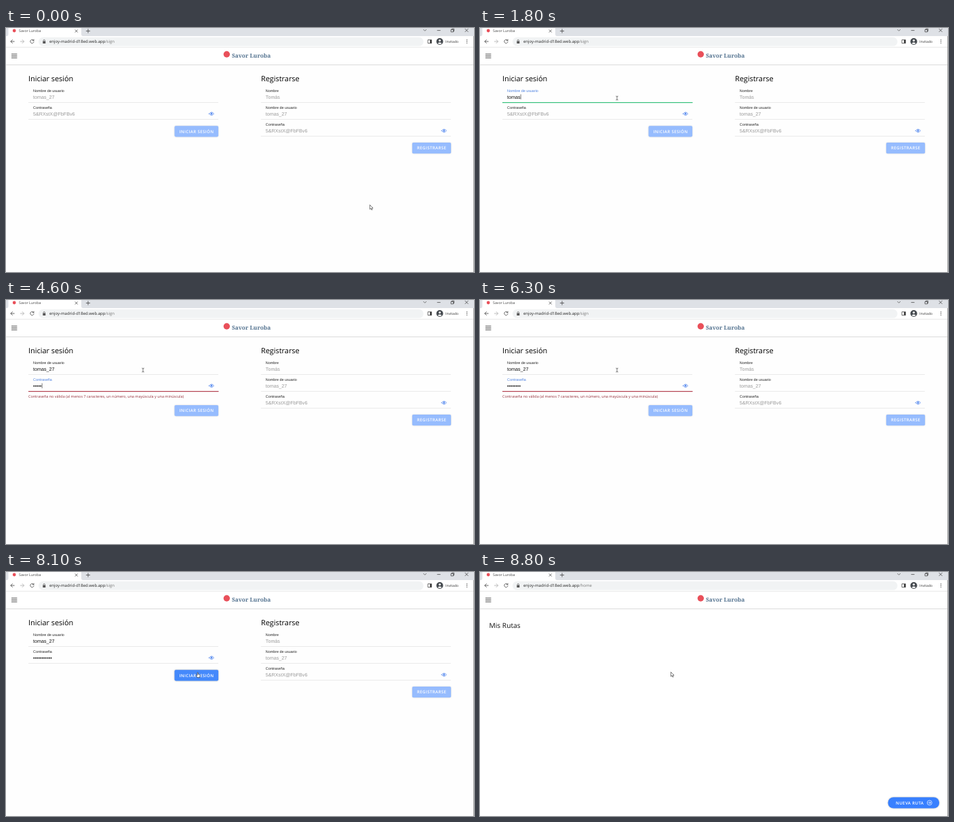
These frames come from a looping animation (690 px wide and 362 px high, 9 s). An HTML page:

```html
<!DOCTYPE html>
<html lang="es">
<head>
<meta charset="utf-8">
<title>Savor Luroba</title>
<style>
  html, body { margin: 0; width: 100%; height: 100%; overflow: hidden; background: #fff; }
  svg { display: block; width: 100%; height: 100%; }
  text { text-rendering: geometricPrecision; white-space: pre; }
  .ui { font-family: "Open Sans", "Noto Sans", sans-serif; }
  .form { font-family: "Liberation Sans", Arial, sans-serif; }
  .brand { font-family: "Noto Serif", serif; font-weight: 700; }
  .caps { font-weight: 600; letter-spacing: .06em; }
  .line { fill: none; stroke-linecap: round; stroke-linejoin: round; }
  .raised { filter: drop-shadow(0 .7px .8px rgba(0, 0, 0, .3)); }
</style>
</head>
<body>
<svg id="stage" viewBox="0 0 690 362" xmlns="http://www.w3.org/2000/svg"></svg>
<script>
const LOOP = 9000, STEP = 100;
const BRAND = 'Savor Luroba', USER = 'tomas_27', SECRET = '5&amp;RXstX@FbFBv6';
const BLUE = '#3880ff', LABEL = '#222', HINT = '#999';
const RED = '#b3404f', GREEN = '#35c07a';

const userKeys = [1200, 1400, 1600, 1700, 1800, 2300, 2600, 2900];
const passKeys = [3800, 4000, 4300, 4500, 4600, 5200, 5600, 5800, 6500, 6700, 6900];
const FOCUS_USER = 700, FOCUS_PASS = 3200, BLUR = 7900, VALID_LENGTH = 9, PAGE_IN = 8350;

// Markup helpers
const text = (x, y, size, str, fill = LABEL, cls = 'ui', extra = '') =>
  `<text x="${x}" y="${y}" font-size="${size}" fill="${fill}" class="${cls}" ${extra}>${str}</text>`;
const rect = (x, y, w, h, fill, extra = '') =>
  `<rect x="${x}" y="${y}" width="${w}" height="${h}" fill="${fill}" ${extra}/>`;
const circle = (x, y, r, fill, extra = '') =>
  `<circle cx="${x}" cy="${y}" r="${r}" fill="${fill}" ${extra}/>`;
const line = (d, color = '#555', width = .8) =>
  `<path class="line" d="${d}" stroke="${color}" stroke-width="${width}"/>`;
const group = (id, body, extra = '') => `<g id="${id}" ${extra}>${body}</g>`;

const eye = (x, y) => `<g transform="translate(${x} ${y})">` +
  line('M-3.5 0Q0-4.6 3.5 0Q0 4.6-3.5 0Z', '#5b8def', .9) +
  circle(0, 0, 1.35, '#5b8def') + '</g>';

const field = (x, y, label, hint, id = '') =>
  text(x + 7, y + 1.9, 5.4, label, LABEL, 'form', id && `id="${id}Label"`) +
  text(x + 7, y + 11.6, 7.2, hint, HINT, 'form', id && `id="${id}Text"`) +
  rect(x, y + 17.3, 280, .6, '#dedede') +
  (id && rect(x, y + 17, 280.5, 1.2, RED, `id="${id}Bar"`));

const button = (x, y, w, label, id) => group(id,
  rect(x, y, w, 16.2, BLUE, 'rx="1.8" class="raised"') +
  text(x + w / 2 + .2, y + 10.4, 6.15, label, '#fff', 'ui caps', 'text-anchor="middle"'),
  'opacity=".52"');

const header = () =>
  rect(0, 28.6, 690, 25.4, '#fff', 'style="filter:drop-shadow(0 .6px .9px rgba(0,0,0,.35))"') +
  [38.8, 41.5, 44.2].map(y => rect(8, y - .45, 8.4, .9, '#333')).join('') +
  circle(325.4, 39, 4.7, '#e9505a') +
  text(333, 43.6, 8.3, BRAND, '#53728f', 'brand');

const browser = () =>
  rect(0, 0, 690, 12, '#dee1e6') +
  '<path d="M1 12Q3.5 12 3.5 9V0H111V9Q111 12 113.5 12Z" fill="#fff"/>' +
  rect(0, 12, 690, 16.6, '#fff') +
  circle(12.2, 4, 2.4, '#e9505a') +
  text(19, 6.2, 5.25, BRAND, '#444') +
  line('M102 2.8l3.4 3.4m0-3.4l-3.4 3.4', '#444', .8) +
  line('M118.3 4.5h5.4m-2.7-2.7v5.4', '#444', .8) +
  line('M615.6 2.3l2 2l2-2', '#444', .7) +
  line('M636 3.6h4.2', '#333', .7) +
  line('M656.4 2.4h3.2v3.4h-3.2zM657.4 2.2v-.9h3.2v3.4h-.8', '#333', .7) +
  line('M677 1.4l4.2 4.2m0-4.2l-4.2 4.2', '#333', .7) +
  line('M12.2 20H7m2.4-2.5L7 20l2.4 2.5', '#555', .9) +
  line('M21.3 20h5.2m-2.4-2.5l2.4 2.5l-2.4 2.5', '#b5b5b5', .9) +
  line('M40.8 18.5a2.7 2.7 0 1 0 .3 2.2M41 17v1.8h-1.8', '#555', .9) +
  rect(48, 13.8, 567.5, 13, '#f1f3f4', 'rx="6.5"') +
  rect(54.3, 19.6, 4, 3.4, '#555', 'rx=".5"') +
  line('M55.1 19.6v-1a1.2 1.2 0 0 1 2.4 0v1', '#555', .7) +
  text(64, 22.4, 6, 'enjoy-madrid-d18ed.web.app<tspan id="path" fill="#777"></tspan>', '#222') +
  line('M622.4 17.6h5v5h-5z', '#444', .8) + rect(625, 17.6, 2.4, 5, '#444') +
  circle(639.5, 20, 5, '#454a4f') + circle(639.5, 18.5, 1.6, '#fff') +
  '<path d="M636.5 22.8q3-3 6 0q-3 2.4-6 0z" fill="#fff"/>' +
  text(648, 21.9, 5.05, 'Invitado', '#333') +
  [17.7, 20, 22.3].map(y => circle(679.6, y, .65, '#444')).join('') +
  rect(0, 28.2, 690, .5, '#dcdcdc');

const signPage = () =>
  header() +
  text(33, 79.3, 10.9, 'Iniciar sesión', '#000', 'ui', 'font-weight="500"') +
  field(33, 93, 'Nombre de usuario', USER, 'user') +
  field(33, 118, 'Contraseña', SECRET, 'pass') + eye(303, 127.2) +
  rect(0, 0, .6, 7.4, '#222', 'id="caret"') +
  text(33, 145.4, 5.48, 'Contraseña no válida (al menos 7 caracteres, un número, ' +
    'una mayúscula y una minúscula)', '#96303c', 'ui', 'id="error"') +
  button(248.5, 145.2, 64.6, 'INICIAR SESIÓN', 'login') +
  text(376, 79.3, 10.9, 'Registrarse', '#000', 'ui', 'font-weight="500"') +
  field(375.8, 93, 'Nombre', 'Tomás') +
  field(375.8, 118, 'Nombre de usuario', USER) +
  field(375.8, 143, 'Contraseña', SECRET) + eye(645.8, 152.4) +
  button(598.9, 170, 57.2, 'REGISTRARSE', 'register');

const homePage = () => group('home',
  rect(0, 28.6, 690, 352, '#fff') + header() +
  text(13.6, 82.6, 10.2, 'Mis Rutas', '#111') +
  rect(601.5, 334.2, 75.6, 16.4, BLUE, 'rx="8.2" class="raised"') +
  text(613, 344.7, 6.15, 'NUEVA RUTA', '#fff', 'ui caps') +
  line('M660.9 342.4h3.6m-1.6-1.6l1.6 1.6l-1.6 1.6', '#fff', .7) +
  circle(662.8, 342.4, 3.5, 'none', 'stroke="#fff" stroke-width=".7"'));

const pointers = () =>
  group('arrow', '<path d="M-1.6-3.6V3L0 1.6L1.1 4L2.1 3.5L1.1 1.2H3.1Z" ' +
    'fill="#fff" stroke="#222" stroke-width=".6" stroke-linejoin="round"/>') +
  group('beam', line('M-1.3-2.9Q0-2.9 0-2.2V2.2Q0 2.9-1.3 2.9M1.3-2.9Q0-2.9 0-2.2M0 2.2Q0 2.9 1.3 2.9', '#222', .6)) +
  group('hand', '<path d="M-1-3.6q.7-.6 1.2 0V-1.2L2.6-.7Q3.3-.4 3.1.6L2.5 3.6H-.8L-2.8.8Q-2.8-.2-1.7.1L-1 .7Z" ' +
    'fill="#fff" stroke="#222" stroke-width=".6" stroke-linejoin="round"/>');

const stage = document.getElementById('stage');
stage.innerHTML = rect(0, 0, 690, 362, '#fefefe') + signPage() + homePage() + browser() +
  rect(689, 12, .8, 350, '#8c8c8c') + pointers();
const el = Object.fromEntries([...stage.querySelectorAll('[id]')].map(n => [n.id, n]));

// Motion helpers
const clamp = v => Math.min(1, Math.max(0, v));
const progress = (t, from, duration) => clamp((t - from) / duration);
const smooth = p => p * p * (3 - 2 * p);
const mix = (a, b, p) => a + (b - a) * p;
const show = (node, on) => node.setAttribute('visibility', on ? 'visible' : 'hidden');
const set = (node, attrs) => {
  for (const key in attrs) node.setAttribute(key, attrs[key]);
};
const typedCount = (keys, t) => keys.filter(k => k <= t).length;

function drawField(name, value, hint, focused, bar, color) {
  el[name + 'Text'].textContent = value || hint;
  set(el[name + 'Text'], { fill: value ? '#111' : HINT });
  set(el[name + 'Label'], { fill: focused ? '#4a7fe0' : LABEL });
  set(el[name + 'Bar'], { height: 1.2 * bar, fill: color });
}

function drawCaret(t) {
  const inUser = t < FOCUS_PASS;
  const name = inUser ? 'user' : 'pass';
  const keys = inUser ? userKeys : passKeys;
  const count = typedCount(keys, t);
  const last = count ? keys[count - 1] : inUser ? FOCUS_USER : FOCUS_PASS;
  show(el.caret, t >= FOCUS_USER && t < BLUR && Math.floor((t - last) / 500) % 2 === 0);
  set(el.caret, {
    x: 40 + (count ? el[name + 'Text'].getComputedTextLength() + .2 : -.3),
    y: inUser ? 98.4 : 123.5
  });
}

function drawPointer(t) {
  const first = smooth(progress(t, 0, 500));
  const second = smooth(progress(t, 7300, 500));
  const x = mix(mix(538, 202, first), 283, second);
  const y = mix(mix(266, 104, first), 153, second);
  const overInput = x > 33 && x < 313 && y > 97 && y < 135;
  const overButton = x > 248 && x < 313 && y > 145 && y < 162 && t < 8600;
  const kind = overButton ? 'hand' : overInput ? 'beam' : 'arrow';
  for (const name of ['arrow', 'beam', 'hand']) show(el[name], name === kind);
  set(el[kind], { transform: `translate(${x} ${t >= 8600 ? y - 1 : y})` });
  el.login.firstChild.setAttribute('fill', overButton ? '#4489fb' : BLUE);
}

function draw(t) {
  const userCount = typedCount(userKeys, t), passCount = typedCount(passKeys, t);
  const valid = passCount >= VALID_LENGTH;
  const invalid = passCount > 0 && !valid;
  const grow = (from, to) => t < to ? progress(t, from - 100, 200) * (t >= from)
                                    : 1 - progress(t, to - 100, 200);

  drawField('user', USER.slice(0, userCount), USER, t >= FOCUS_USER && t < FOCUS_PASS,
    grow(FOCUS_USER, FOCUS_PASS), userCount ? GREEN : RED);
  drawField('pass', '•'.repeat(passCount), SECRET.replace('&amp;', '&'),
    t >= FOCUS_PASS && t < BLUR, grow(FOCUS_PASS, BLUR), valid ? GREEN : RED);
  drawCaret(t);

  show(el.error, invalid);
  set(el.login, { transform: `translate(0 ${invalid ? 10.8 : 0})`, opacity: valid ? 1 : .52 });

  const enter = 1 - (1 - progress(t, PAGE_IN, 280)) ** 4;
  set(el.home, { opacity: enter, transform: `translate(0 ${18 * (1 - enter)})` });
  el.path.textContent = t >= 8400 ? '/home' : '/sign';
  drawPointer(t);
}

const start = performance.now();
function tick() {
  const t = (performance.now() - start) % LOOP;
  draw(Math.floor(t / STEP) * STEP);
  requestAnimationFrame(tick);
}
tick();
</script>
</body>
</html>
```
